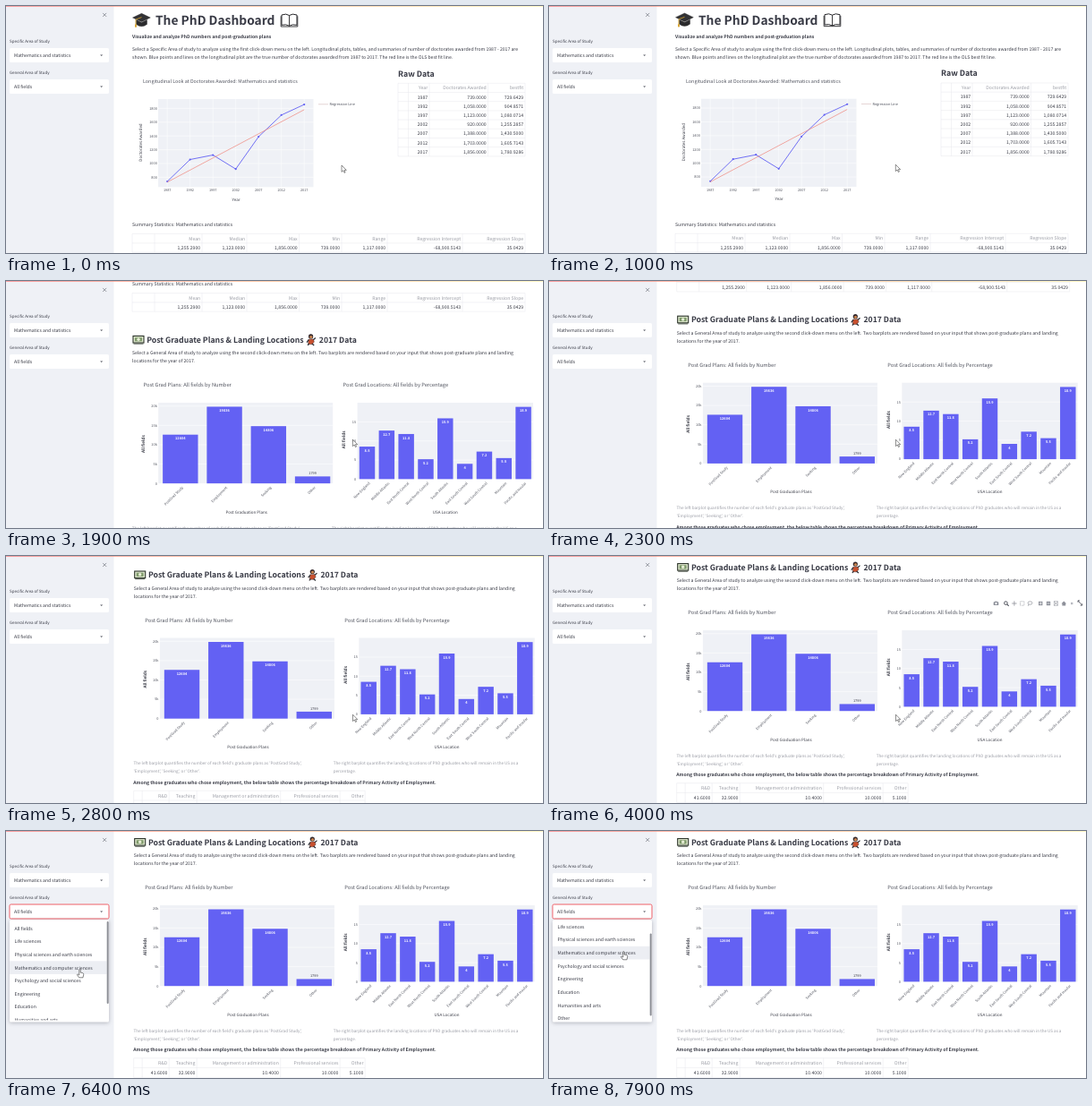
These frames come from a looping animation (600x276 px, 8000 ms). An HTML page:

```html
<!DOCTYPE html>
<html lang="en">
<head>
<meta charset="utf-8">
<title>The PhD Dashboard</title>
<style>
html, body { margin: 0; width: 100%; height: 100%; overflow: hidden; background: #fff; }
svg { display: block; width: 100vw; height: 100vh; }
text {
  font-family: 'Noto Sans CJK JP', 'Noto Sans CJK SC', 'Noto Sans CJK', 'Noto Sans', sans-serif;
  text-rendering: geometricPrecision; white-space: pre;
}
#list { filter: drop-shadow(0 1px 2px rgba(40, 44, 60, .3)); }
</style>
</head>
<body>
<svg id="stage" viewBox="0 0 600 276" preserveAspectRatio="none"></svg>
<script>
const LOOP = 8000;
const INK = '#383a45', SOFT = '#50535e', PALE = '#9a9ca5', RULE = '#e6e7ec',
      PANEL = '#eff1f6', BLUE = '#6361f3', RED = '#ee5058';
const BODY = 5.15, TICK = 3.9;

// Shape helpers; text is placed by the vertical middle of its capitals.
const text = (x, y, s, { size = BODY, fill = INK, anchor = 'start', bold = false, turn = 0 } = {}) => {
  const safe = s.replace(/&/g, '&amp;');
  const spin = turn ? ` transform="rotate(${turn} ${x} ${y})"` : '';
  return `<text x="${x}" y="${y + size * 0.36}" font-size="${size}" fill="${fill}" text-anchor="${anchor}"` +
    `${bold ? ' font-weight="700"' : ''}${spin}>${safe}</text>`;
};
const rect = (x, y, w, h, fill, extra = '') =>
  `<rect x="${x}" y="${y}" width="${w}" height="${h}" fill="${fill}" ${extra}/>`;
const path = (d, stroke, width = 0.6, fill = 'none', extra = '') =>
  `<path d="${d}" stroke="${stroke}" stroke-width="${width}" fill="${fill}" ${extra}/>`;
const group = (id, body, extra = '') => `<g id="${id}" ${extra}>${body}</g>`;

// Right-aligned table: edges are the column borders, the first column is blank.
function table(edges, top, pitch, rows) {
  const left = edges[0], right = edges[edges.length - 1], bottom = top + pitch * rows.length;
  let out = '';
  rows.forEach((row, r) => {
    row.forEach((cell, c) => {
      out += text(edges[c + 2] - 1.8, top + pitch * (r + 0.52), cell,
        { anchor: 'end', fill: r ? INK : PALE });
    });
  });
  for (let r = 0; r <= rows.length; r++) out += path(`M${left} ${top + pitch * r}H${right}`, RULE, 0.5);
  edges.forEach(x => { out += path(`M${x} ${top}V${bottom}`, RULE, 0.5); });
  return out;
}

function lineChart() {
  const years = [1987, 1992, 1997, 2002, 2007, 2012, 2017];
  const awarded = [739, 1058, 1123, 920, 1388, 1703, 1856];
  const px = i => 180.2 + 25.5 * i, py = v => 114.4 + (1800 - v) * 0.077;
  let out = text(153, 84, 'Longitudinal Look at Doctorates Awarded: Mathematics and statistics',
    { size: 5.4, fill: SOFT });
  out += rect(170, 104, 173.5, 98.3, PANEL);
  for (let v = 800; v <= 1800; v += 200) {
    out += path(`M170 ${py(v)}H343.5`, '#fff', 0.5);
    out += text(168.8, py(v), String(v), { size: TICK, fill: SOFT, anchor: 'end' });
  }
  years.forEach((y, i) => {
    out += path(`M${px(i)} 104V202.3`, '#fff', 0.5);
    out += text(px(i), 206, String(y), { size: TICK, fill: SOFT, anchor: 'middle' });
  });
  out += path('M' + awarded.map((v, i) => `${px(i)} ${py(v)}`).join('L'), BLUE, 0.9);
  awarded.forEach((v, i) => { out += `<circle cx="${px(i)}" cy="${py(v)}" r="1.1" fill="${BLUE}"/>`; });
  out += path(`M${px(0)} ${py(729.6)}L${px(6)} ${py(1780.9)}`, '#f0867c', 0.7);
  out += path('M349 109.8H360', '#c9a8a8', 0.5);
  out += text(361.5, 109.8, 'Regression Line', { size: TICK, fill: SOFT });
  out += text(257, 216, 'Year', { size: 4.5, anchor: 'middle' });
  return out + text(150, 152.5, 'Doctorates Awarded', { size: 4.5, anchor: 'middle', turn: -90 });
}

function barChart(o) {
  const pitch = o.width / o.names.length, bar = pitch * 0.8;
  let out = text(o.titleX, 357, o.title, { size: 5.75, fill: SOFT });
  out += rect(o.x, 377, o.panel, o.base - 377, PANEL);
  o.ticks.forEach((label, i) => {
    const y = o.base - i * o.step;
    if (i) out += path(`M${o.x} ${y}h${o.panel}`, '#fff', 0.5);
    out += text(o.x - 1.4, y, label, { size: TICK, fill: SOFT, anchor: 'end' });
  });
  o.names.forEach((name, i) => {
    const cx = o.x + pitch * (i + 0.5), h = o.values[i] * o.scale, top = o.base - h;
    const inside = h > 12;
    out += rect(cx - bar / 2, top, bar, h, BLUE);
    out += text(cx, inside ? top + 4.2 : top - 3.6, String(o.values[i]),
      { size: 3.9, fill: inside ? '#fff' : INK, anchor: 'middle', bold: inside });
    out += text(cx + 2.5, o.base + 4, name, { size: TICK, fill: SOFT, anchor: 'end', turn: -45 });
  });
  out += text(o.x + o.width / 2, 499, o.xTitle, { size: 4.5, anchor: 'middle' });
  return out + text(o.yTitleX, o.base - 44, 'All fields', { size: 4.7, anchor: 'middle', turn: -90, bold: true });
}

function icons() {
  const cap = path('M141.5 13L151.5 8.3L161.3 13L151.5 17.7Z', '#222', 0.4, '#333336') +
    path('M145.5 15.5V20.5Q151.5 25 157.5 20.5V15.5L151.5 18.5Z', '#222', 0.4, '#2a2a2c') +
    path('M151.5 12.6L145 15V22', '#c99a2e', 0.9) + rect(144, 20.5, 2, 3.2, '#d8a73a');
  const book = path('M308 10Q313 8 316.5 10.5Q320 8 325 10V21.3Q320 20 316.5 22.3Q313 20 308 21.3Z',
    '#26262a', 1, '#fff') + path('M316.5 10.5V22.3M307.2 11.3V23H325.8V11.3', '#26262a', 0.9);
  const money = rect(142, 302.5, 12, 7.6, '#dfe8cf', 'stroke="#2c342a" stroke-width="1.1"') +
    rect(144, 304.2, 8, 4.2, '#7f9a6b') + '<circle cx="148" cy="306.3" r="1.7" fill="#e8efd8"/>' +
    path('M142.5 311.2H153.5', '#3d463a', 0.9);
  const person = '<circle cx="340.6" cy="303" r="2.6" fill="#33272a"/>' +
    '<circle cx="340.8" cy="303.6" r="1.6" fill="#c98550"/>' +
    path('M338 306.2L343.4 306L344.4 309L342 311.8H337.6Z', '#2a2a30', 0.4, '#c8502e') +
    path('M338.2 306.8L336 309.6M343.4 306.8L345.8 304.6', '#2a2a30', 1.2) +
    path('M338.6 311L337.2 313M342 311L344.2 313', '#2a2a30', 1.2);
  return cap + book + money + person;
}

function modebar() {
  const y = 347, c = '#8d9099';
  const box = (x, fill, extra) => rect(x - 2.2, y - 2.2, 4.4, 4.4, fill, extra);
  const sign = '#fff';
  return rect(495, y - 1.7, 5.6, 3.8, c, 'rx=".7"') + rect(496.5, y - 2.4, 2.4, 1, c) +
    `<circle cx="497.8" cy="${y + 0.2}" r="1.1" fill="#fff"/>` +
    `<circle cx="508.7" cy="${y - 0.4}" r="1.8" fill="none" stroke="#4c4f59" stroke-width="1"/>` +
    path(`M510 ${y + 0.9}l2 2`, '#4c4f59', 1.1) +
    path(`M515.5 ${y}h5.4M518.2 ${y - 2.7}v5.4`, c, 0.8) +
    box(527, 'none', `stroke="${c}" stroke-width=".6" stroke-dasharray="1 .6"`) +
    `<ellipse cx="535.8" cy="${y - 0.5}" rx="2.5" ry="1.7" fill="none" stroke="${c}" stroke-width=".7"/>` +
    path(`M534.3 ${y + 1}l-.6 1.8`, c, 0.7) +
    box(547.5, c) + path(`M546 ${y}h3M547.5 ${y - 1.5}v3`, sign, 0.7) +
    box(556.3, c) + path(`M554.8 ${y}h3`, sign, 0.7) +
    path(`M562.5 ${y - 2.2}l4.4 4.4M566.9 ${y - 2.2}l-4.4 4.4`, c, 0.7) +
    box(564.7, 'none', `stroke="${c}" stroke-width=".5"`) +
    path(`M570.8 ${y + 0.2}l2.8-2.6l2.8 2.6h-.9v2.2h-3.8v-2.2z`, 'none', 0, c) +
    rect(581.3, y - 1.2, 2.4, 2.4, '#b9bbc2') +
    path(`M589.3 ${y - 1.2}v-2h2M594 ${y + 0.2}v2h-2M589.5 ${y - 3}l4.3 5`, '#4c4f59', 0.8);
}

function page() {
  const bestfit = ['729.6429', '904.8571', '1,080.0714', '1,255.2857', '1,430.5000', '1,605.7143', '1,780.9286'];
  const awarded = ['739', '1,058', '1,123', '920', '1,388', '1,703', '1,856'];
  const raw = bestfit.map((fit, i) => [String(1987 + 5 * i), awarded[i] + '.0000', fit]);
  const note = (x, y, s) => text(x, y, s, { size: 4.6, fill: PALE });
  return icons() +
    text(167, 16, 'The PhD Dashboard', { size: 13.8, bold: true }) +
    text(141, 34, 'Visualize and analyze PhD numbers and post-graduation plans', { bold: true, size: 5.1 }) +
    text(141, 48.3, 'Select a Specific Area of study to analyze using the first click-down menu on the left. Longitudinal plots, tables, and summaries of number of doctorates awarded from 1987 - 2017 are') +
    text(141, 57.3, 'shown. Blue points and lines on the longitudinal plot are the true number of doctorates awarded from 1987 to 2017. The red line is the OLS best fit line.') +
    lineChart() +
    text(438, 75.5, 'Raw Data', { size: 8.8, bold: true }) +
    table([438, 449.5, 473, 538.5, 580], 86.3, 10.2, [['Year', 'Doctorates Awarded', 'bestfit'], ...raw]) +
    text(141, 244, 'Summary Statistics: Mathematics and statistics') +
    table([141, 166, 219, 269, 327.5, 375, 426, 510, 580], 254.6, 10.3, [
      ['Mean', 'Median', 'Max', 'Min', 'Range', 'Regression Intercept', 'Regression Slope'],
      ['1,255.2900', '1,123.0000', '1,856.0000', '739.0000', '1,117.0000', '-68,900.5143', '35.0429']]) +
    text(157.2, 306.5, 'Post Graduate Plans & Landing Locations', { size: 8.75, bold: true }) +
    text(349.8, 306.5, '2017 Data', { size: 8.65, bold: true }) +
    text(141, 321.5, 'Select a General Area of study to analyze using the second click-down menu on the left. Two barplots are rendered based on your input that shows post-graduate plans and landing') +
    text(141, 330.5, 'locations for the year of 2017.') +
    barChart({
      title: 'Post Grad Plans: All fields by Number', titleX: 153.5, x: 170.2, width: 197, panel: 195, base: 467.2,
      step: 21.6, scale: 21.6 / 5000, ticks: ['0', '5k', '10k', '15k', '20k'],
      names: ['PostGrad Study', 'Employment', 'Seeking', 'Other'], values: [12604, 19836, 14806, 1799],
      xTitle: 'Post Graduation Plans', yTitleX: 153.4 }) +
    barChart({
      title: 'Post Grad Locations: All fields by Percentage', titleX: 376.5, x: 392.6, width: 196.4, panel: 196.4,
      base: 462.4, step: 21.3, scale: 4.27, ticks: ['0', '5', '10', '15'],
      names: ['New England', 'Middle Atlantic', 'East North Central', 'West North Central', 'South Atlantic',
        'East South Central', 'West South Central', 'Mountain', 'Pacific and Insular'],
      values: [8.5, 12.7, 11.8, 5.2, 15.9, 4, 7.2, 5.5, 18.9],
      xTitle: 'USA Location', yTitleX: 377.8 }) +
    note(140.8, 517, "The left barplot quantifies the number of each field's graduate plans as 'PostGrad Study',") +
    note(140.8, 526, "'Employment', 'Seeking', or 'Other'.") +
    note(364, 517, 'The right barplot quantifies the landing locations of PhD graduates who will remain in the US as a') +
    note(364, 526, 'percentage.') +
    text(140.5, 538.5, 'Among those graduates who chose employment, the below table shows the percentage breakdown of Primary Activity of Employment.', { bold: true, size: 5.13 }) +
    table([141, 150.5, 180.5, 211.5, 305, 371.5, 399.5], 547.8, 10.8, [
      ['R&D', 'Teaching', 'Management or administration', 'Professional services', 'Other'],
      ['41.6000', '32.9000', '10.4000', '10.0000', '5.1000']]) +
    group('tools', modebar());
}

const FIELDS = ['All fields', 'Life sciences', 'Physical sciences and earth sciences',
  'Mathematics and computer sciences', 'Psychology and social sciences', 'Engineering', 'Education',
  'Humanities and arts', 'Other'];
const ROW = 14.65, FIRST = 108.7;

function sidebar() {
  const select = (y, label, value) => text(4, y - 8, label, { size: 4.47 }) +
    rect(4, y, 111, 16, '#fff', 'rx="1.6"') + text(9, y + 8, value) +
    path(`M105.2 ${y + 7.4}h3l-1.5 1.7z`, 'none', 0, SOFT);
  return rect(0, 0, 120.5, 276, PANEL) + path('M108.2 7.9l4 4M112.2 7.9l-4 4', '#7d808b', 0.8) +
    select(47, 'Specific Area of Study', 'Mathematics and statistics') +
    select(82, 'General Area of Study', 'All fields') +
    group('focus', rect(4, 82, 111, 16, 'none', `rx="1.6" stroke="${RED}" stroke-width=".9"`));
}

function dropdown() {
  const rows = FIELDS.map((f, i) => text(9.5, FIRST + ROW * i, f)).join('');
  return group('list', rect(4, 99.3, 111, 114.2, '#fff', 'rx="1.6"') +
    `<g clip-path="url(#window)">` +
    group('rows', `<rect id="hover" x="4" width="108.5" height="${ROW}" fill="#eceef3"/>` + rows) + '</g>' +
    `<rect id="thumb" x="112.7" y="101" width="2" height="92" rx="1" fill="#8d8f96"/>`);
}

const arrow = path('M0 0V7.4L1.8 5.8L3 8.4L4.1 7.9L3 5.4H5.3Z', '#333', 0.55, '#fff');
const hand = path('M-.7 .6Q0 -.4 .7 .6V3.6L3.4 4.2Q4.4 4.6 4.2 6L3.5 9.3H-.8L-3 6.3Q-3 5.2 -1.9 5.7L-.7 6.5Z',
  '#333', 0.6, '#fff');

document.getElementById('stage').innerHTML = `<defs>
  <clipPath id="window"><rect x="4" y="100.5" width="111" height="111"/></clipPath>
  <linearGradient id="band"><stop offset="0" stop-color="#ff6a6a"/><stop offset=".5" stop-color="#ffb27a"/>
  <stop offset="1" stop-color="#fff3a0"/></linearGradient></defs>` +
  rect(0, 0, 600, 276, '#fff') + group('page', page()) + sidebar() + dropdown() +
  rect(0, 0, 600, 0.6, 'url(#band)') + group('arrow', arrow) + group('hand', hand);

const el = {};
for (const id of ['page', 'tools', 'focus', 'list', 'rows', 'hover', 'thumb', 'arrow', 'hand'])
  el[id] = document.getElementById(id);

// Keys are [time, value, ...]; values run straight between them unless eased.
function track(keys, t, column = 1, ease = u => u) {
  let i = 0;
  while (i < keys.length - 1 && keys[i + 1][0] <= t) i++;
  const a = keys[i], b = keys[i + 1];
  if (t <= a[0] || !b) return a[column];
  return a[column] + (b[column] - a[column]) * ease((t - a[0]) / (b[0] - a[0]));
}
const smooth = u => u * u * (3 - 2 * u);

const SCROLL = [[1000, 0], [1400, 127], [1900, 241], [2700, 285.5], [2800, 285.5], [3300, 294]];
const POINTER = [[100, 375, 178], [900, 387.3, 177.2], [2700, 387.5, 177.2], [4200, 387.5, 177.2],
  [5000, 111, 96], [5300, 95, 88], [5600, 93, 89], [5900, 90, 112], [6150, 85, 168],
  [6400, 82.5, 154.5], [7200, 82.5, 154.5], [7700, 83.5, 134.5]];
const LIST_SCROLL = [[6650, 0], [7000, 16.5]];
const OPEN = 5500;

const show = (node, on) => { node.style.display = on ? '' : 'none'; };
const move = (node, x, y) => node.setAttribute('transform', `translate(${x} ${y})`);

function draw(t) {
  const x = track(POINTER, t, 1, smooth), y = track(POINTER, t, 2, smooth);
  const open = t >= OPEN, offset = track(LIST_SCROLL, t);
  move(el.page, t >= 2300 ? 1.7 : 0, -track(SCROLL, t));
  show(el.tools, t >= 3700 && t < 4500);
  show(el.focus, open);
  show(el.list, open);
  move(el.rows, 0, -offset);
  move(el.thumb, 0, offset * 0.82);
  const over = Math.max(0, Math.round((y - FIRST + offset) / ROW));
  el.hover.setAttribute('y', FIRST + ROW * (over - 0.5));
  show(el.hover, y > 100);
  show(el.arrow, !open);
  show(el.hand, open);
  move(el.arrow, x, y);
  move(el.hand, x, y);
}

function tick() {
  draw(performance.now() % LOOP);
  requestAnimationFrame(tick);
}
tick();
</script>
</body>
</html>
```
